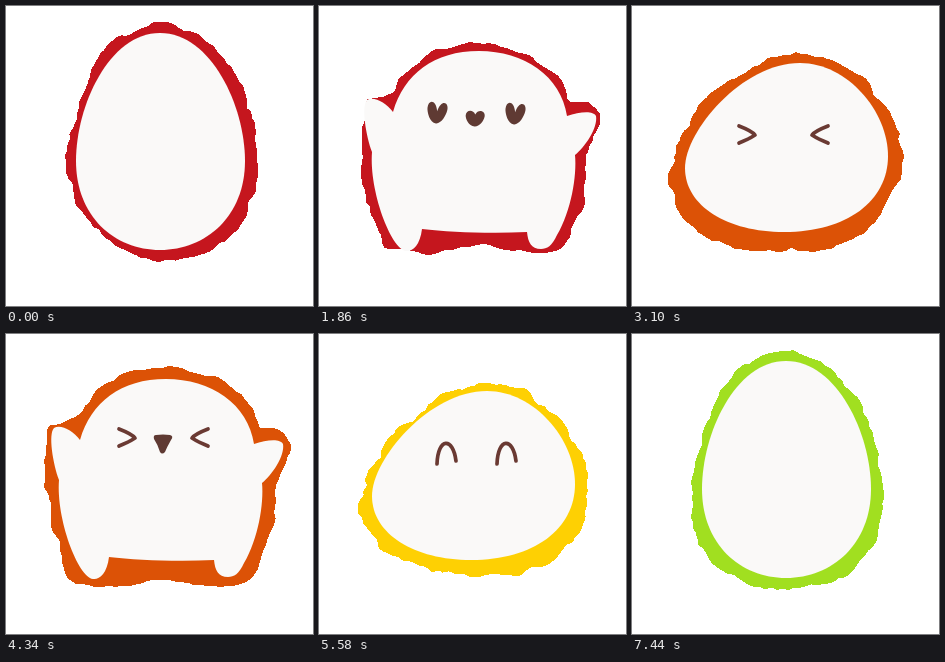
Write an HTML page that moves like this. It is 307 px wide and 300 px high and loops after 8000 ms.

```html
<!DOCTYPE html>
<html lang="en">
<head>
<meta charset="utf-8">
<title>Hatching blob</title>
<style>
  html, body { margin: 0; width: 100%; height: 100%; overflow: hidden; background: #fff; }
  svg { display: block; width: 100%; height: 100%; }
  .scene { visibility: hidden; }
  .scene.on { visibility: visible; }
  .rim { shape-rendering: crispEdges; }
  .skin { fill: #faf9f8; }
  .line { fill: none; stroke: #6a3a33; stroke-width: 3.7; stroke-linecap: round; stroke-linejoin: round; }
  .ink { fill: #5f3a33; }
</style>
</head>
<body>
<svg id="stage" viewBox="0 0 307 300"></svg>
<script>
const STEP = 620, LOOP = 8000, COUNT = Math.ceil(LOOP / STEP);

const egg = 'M154 27C205 27 239 100 239 155C239 210 200 244 154 244C108 244 70 210 70 155C70 100 103 27 154 27Z';
const wide = 'M168 57C215 57 256 105 256 150C256 195 215 226 152 226C95 226 53 200 53 162C53 125 110 57 168 57Z';
const body = 'M160 45C205 45 242 70 248 110C260 106 274 104 277 110C279 122 266 141 256 149' +
  'C258 170 252 205 238 229C233 240 228 243 222 243C212 243 209 236 208 226' +
  'C170 228 130 226 103 223C101 240 93 246 87 245C72 243 50 185 53 146' +
  'C47 130 42 100 48 94C55 90 67 97 74 106C85 68 115 45 160 45Z';
const bodyRim = 'M150 37C200 37 240 60 250 96C268 94 280 104 281 112C276 130 268 140 264 150' +
  'C272 175 262 212 238 240C226 254 205 246 160 241C120 245 95 251 66 240' +
  'C52 210 40 165 42 140C42 115 42 100 47 93C62 90 70 88 78 80C95 55 120 37 150 37Z';

const line = d => `<path class="line" d="${d}"/>`;
const ink = (d, extra = '') => `<path class="ink" d="${d}" ${extra}/>`;
const heart = (x, y, w, h, cleft, turn) => ink(
  `M0 .5C-.32 .5 -.5 0 -.5 -.2C-.5 -.6 -.12 -.65 0 ${cleft}C.14 -.7 .54 -.58 .5 -.2C.46 .12 .25 .5 0 .5Z`,
  `transform="translate(${x} ${y}) rotate(${turn}) scale(${w} ${h})"`);

// Each eye is drawn around its own centre; side is -1 (left) or 1 (right)
const loveEye = (x, y, side) => heart(x, y + (side + 1) / 2, 20, 21, -0.08, 6);
const squeezedEye = (x, y, s) =>
  line(`M${x + 8 * s} ${y - 9}Q${x - 5 * s} ${y - 4} ${x - 8 * s} ${y}Q${x - 2 * s} ${y + 4} ${x + 8 * s} ${y + 8}`);
const archedEye = (x, y) => line(`M${x - 9} ${y + 10}C${x - 8} ${y - 17} ${x + 7} ${y - 17} ${x + 10} ${y + 7}`);

// eyes: left x, right x, y; rise: how the eyes move on the standing body
const moods = [
  { color: '#c5161e', grow: 0, eye: loveEye, eyes: [118, 196, 124], rise: [0, -17],
    mouth: heart(156, 113, 19, 15, -0.3, 3) },
  { color: '#dc5206', grow: 4, eye: squeezedEye, eyes: [115, 188, 129], rise: [6, -25],
    mouth: ink('M150 101Q157 100 164 101Q168 102 165 106Q161 113 159 118Q156 121 154 118Q152 111 148 105Q147 101 150 101Z') },
  { color: '#fed003', grow: 1, eye: archedEye, eyes: [127, 187, 120], rise: [0, -17],
    mouth: line('M149 108Q157 120 165 108') },
  { color: '#a1df20', grow: 0 }
];

// box: left, top, right and bottom of the torn rim
const poses = [
  { skin: egg, rim: egg, box: [59, 16, 252, 256] },
  { skin: wide, rim: wide, box: [40, 50, 268, 242], face: () => [0, 0] },
  { skin: wide, rim: wide, box: [39, 46, 276, 241], face: () => [4, 0], flip: true },
  { skin: body, rim: bodyRim, box: [42, 36, 281, 249], face: mood => mood.rise, mouth: true }
];

function random(seed) {
  return () => {
    seed = (seed * 16807) % 2147483647;
    return seed / 2147483647 - 0.5;
  };
}

// Smooth closed noise for u in 0..1
function ringNoise(rnd, cells, size) {
  const v = Array.from({ length: cells }, () => rnd() * size);
  return u => {
    const i = Math.floor(u * cells), f = u * cells - i;
    const s = f * f * (3 - 2 * f);
    return v[i] * (1 - s) + v[(i + 1) % cells] * s;
  };
}

// Walk the outline, roughen it, then fit it to the box
function tornRim(d, box, flip, seed) {
  const path = document.createElementNS('http://www.w3.org/2000/svg', 'path');
  path.setAttribute('d', d);
  const total = path.getTotalLength(), count = 260;
  const rnd = random(seed * 7919 + 13);
  const waves = [[10, 5], [38, 5], [120, 2.5]].map(([cells, size]) => ringNoise(rnd, cells, size));
  const pts = Array.from({ length: count }, (_, k) => {
    const p = path.getPointAtLength(total * k / count);
    const x = p.x - 155, y = p.y - 145;
    const scale = 1 + waves.reduce((sum, w) => sum + w(k / count), 0) / Math.hypot(x, y);
    return [(flip ? -x : x) * scale, y * scale];
  });
  const fit = axis => {
    const vals = pts.map(p => p[axis]);
    const lo = Math.min(...vals), hi = Math.max(...vals);
    return v => box[axis] + (v - lo) / (hi - lo) * (box[axis + 2] - box[axis]);
  };
  const fx = fit(0), fy = fit(1);
  return pts.map(([x, y]) => fx(x).toFixed(1) + ',' + fy(y).toFixed(1)).join(' ');
}

function face(mood, pose) {
  if (!pose.face) return '';
  const [left, right, y] = mood.eyes, [dx, dy] = pose.face(mood);
  return mood.eye(left + dx, y + dy, -1) + mood.eye(right + dx, y + dy, 1) + (pose.mouth ? mood.mouth : '');
}

function scene(i) {
  const pose = poses[i % 4], mood = moods[Math.floor(i / 4)];
  const box = pose.box.map((v, side) => v + (side < 2 ? -mood.grow : mood.grow));
  return `<g class="scene">
    <polygon class="rim" fill="${mood.color}" points="${tornRim(pose.rim, box, pose.flip, i + 1)}"/>
    <path class="skin" d="${pose.skin}" ${pose.flip ? 'transform="matrix(-1 0 0 1 318 0)"' : ''}/>
    ${face(mood, pose)}
  </g>`;
}

const stage = document.getElementById('stage');
stage.innerHTML = Array.from({ length: COUNT }, (_, i) => scene(i)).join('');

const groups = [...stage.children];
function draw() {
  const now = Math.floor(performance.now() % LOOP / STEP);
  groups.forEach((g, i) => g.classList.toggle('on', i === now));
  requestAnimationFrame(draw);
}
draw();
</script>
</body>
</html>
```
